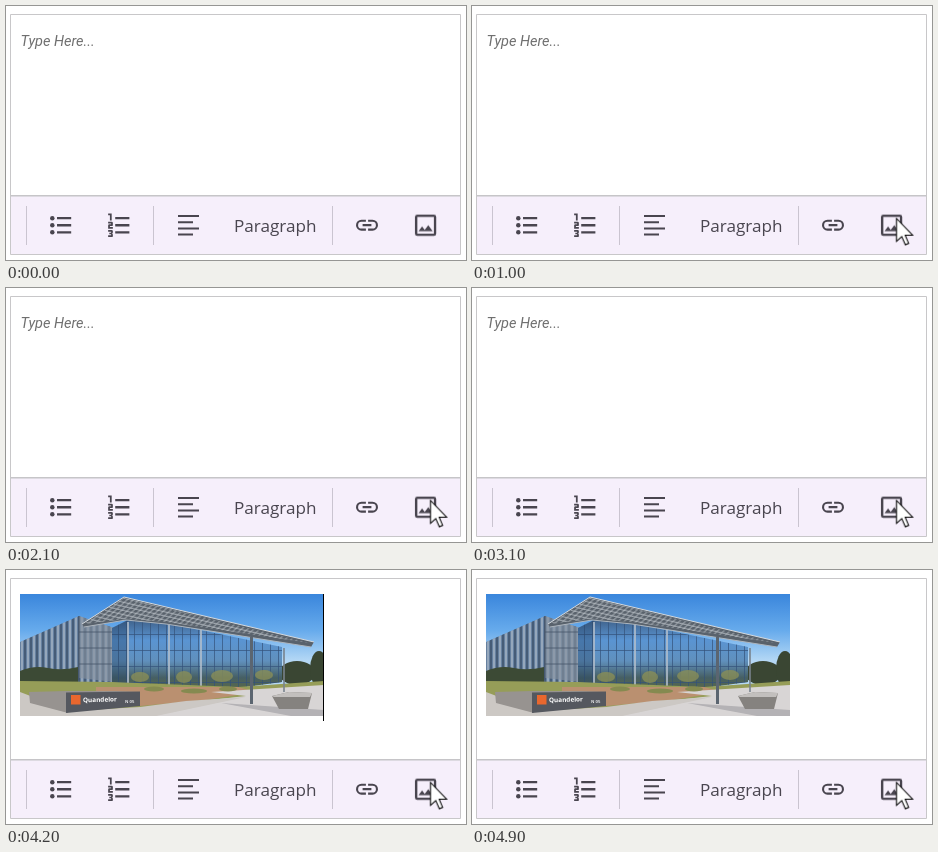
These frames come from a looping animation (460 px wide and 254 px high, 5 s). An HTML page:

```html
<!DOCTYPE html>
<html lang="en">
<head>
<meta charset="utf-8">
<title>Rich text editor</title>
<style>
html, body { margin: 0; width: 100%; height: 100%; overflow: hidden; background: #fff; }
svg { display: block; width: 460px; height: 254px; }
.hint { font: italic 14.5px Roboto, sans-serif; fill: #6f6f6f; }
.style { font: 17.1px "Open Sans", sans-serif; fill: #49454f; }
.brand { font: bold 6.4px "Open Sans", sans-serif; fill: #fff; }
.plate { font: bold 4.2px "Open Sans", sans-serif; fill: #e4e4e6; }
.icon { fill: #49454f; }
.anim { animation: 5s step-end infinite; }
#hint { animation-name: hint; }
#caret { animation-name: blink; }
#tall { animation-name: tall; }
#photo { animation-name: photo; }
#press { animation-name: press; }
#pic { animation-name: dim; }
#mouse { animation-name: move; }
@keyframes hint { 0% { opacity: 1; } 82%, to { opacity: 0; } }
@keyframes blink {
  0%, 20%, 40%, 62%, 82%, to { opacity: 0; }
  10%, 34%, 50%, 70% { opacity: 1; }
}
@keyframes tall { 0%, 92%, to { opacity: 0; } 82% { opacity: 1; } }
@keyframes photo { 0% { opacity: 0; } 84%, to { opacity: 1; } }
@keyframes press { 0%, 36%, to { opacity: 0; } 34% { opacity: .05; } }
@keyframes dim { 0%, 40%, to { opacity: 1; } 34% { opacity: .88; } }
@keyframes move {
  0% { transform: translate(418px, 270px); }
  4% { transform: translate(418px, 249px); }
  6% { transform: translate(423px, 240px); }
  8% { transform: translate(425.5px, 229px); }
  10% { transform: translate(425.5px, 220px); }
  12% { transform: translate(425px, 214px); }
  14%, to { transform: translate(424.5px, 212.5px); }
}
</style>
</head>
<body>
<svg viewBox="0 0 460 254">
  <defs>
    <linearGradient id="sky" x2="0" y2="1">
      <stop offset="0" stop-color="#3a86dc"/>
      <stop offset=".3" stop-color="#67abec"/>
      <stop offset=".55" stop-color="#b5d8f5"/>
    </linearGradient>
    <linearGradient id="glass" x2="0" y2="1">
      <stop offset="0" stop-color="#40638c"/>
      <stop offset=".3" stop-color="#5a94d2"/>
      <stop offset=".6" stop-color="#6090bd"/>
      <stop offset=".85" stop-color="#465f63"/>
      <stop offset="1" stop-color="#57684c"/>
    </linearGradient>
    <pattern id="panes" width="8" height="16" patternUnits="userSpaceOnUse">
      <path d="M0 .5H8M.5 0V16" stroke="#34517a" stroke-width=".7"/>
    </pattern>
    <pattern id="fins" width="6" height="14" patternUnits="userSpaceOnUse">
      <path d="M1 0V14" stroke="#30435c" stroke-width="1.2"/>
      <path d="M4 0V14" stroke="#a9b8c8" stroke-width="1.4"/>
    </pattern>
    <pattern id="slats" width="5" height="4" patternUnits="userSpaceOnUse" patternTransform="rotate(13) skewX(-35)">
      <path d="M0 1H5M1 0V4" stroke="#b9c0c6" stroke-width=".9"/>
    </pattern>
    <path id="wing" d="M14 72L73 46 108 58V113H14Z"/>
    <path id="hall" d="M106 58L122 50 160 53 276 77V112L232 118 106 114Z"/>
    <path id="rows" d="M9 5H21V7H9ZM9 11H21V13H9ZM9 17H21V19H9Z"/>
    <clipPath id="crop"><rect x="14" y="24" width="304" height="122"/></clipPath>
  </defs>

  <rect width="460" height="254" fill="#fff"/>
  <rect x="5" y="190" width="450" height="58" fill="#f6effb"/>
  <path d="M4.5 8.5H454.5V248.5H4.5Z" fill="none" stroke="#c8c7c9"/>
  <rect x="5" y="189" width="449" height="1.5" fill="#c6c5c8"/>
  <path d="M20.5 200V239M147.5 200V239M326.5 200V239" stroke="#cac4d0"/>

  <text id="hint" class="hint anim" x="14.5" y="40">Type Here...</text>
  <rect id="caret" class="anim" x="14.4" y="27" width="1.2" height="19"/>

  <g id="photo" class="anim"><g clip-path="url(#crop)">
    <rect x="14" y="24" width="304" height="122" fill="url(#sky)"/>
    <g fill="#3a4633">
      <ellipse cx="291" cy="103" rx="18" ry="12"/>
      <ellipse cx="313" cy="99" rx="9" ry="18"/>
    </g>
    <!-- left wing -->
    <use href="#wing" fill="#66809f"/>
    <use href="#wing" fill="url(#fins)"/>
    <path d="M73 46L108 58V112L73 108Z" fill="#8793a0" opacity=".65"/>
    <path d="M73 62H108M73 78H108M73 94H108M73 46V110" stroke="#465567" stroke-width=".8"/>
    <path d="M14 101Q28 95 42 98T72 97V112H14Z" fill="#3c4a35"/>
    <!-- glass hall -->
    <use href="#hall" fill="url(#glass)"/>
    <use href="#hall" fill="url(#panes)"/>
    <path d="M106 58L122 50V115L106 114Z" fill="#243f63" opacity=".35"/>
    <g fill="#8d9157" opacity=".75">
      <ellipse cx="134" cy="107" rx="9" ry="5"/>
      <ellipse cx="178" cy="107" rx="8" ry="6"/>
      <ellipse cx="216" cy="106" rx="11" ry="6"/>
      <ellipse cx="258" cy="105" rx="9" ry="5"/>
    </g>
    <path d="M122 52V116M163 55V118M195 60V119" stroke="#b4c0cd" stroke-width="1.6"/>
    <!-- canopy -->
    <path d="M76 54L118 27 308 72 305 77 160 54 120 50 78 57Z" fill="#59626c"/>
    <path d="M78 54L118 28 304 73 160 52 120 49Z" fill="url(#slats)"/>
    <path d="M76 54L118 27 308 72" fill="none" stroke="#d5dadf"/>
    <path d="M78 57L120 50 160 54 305 77" fill="none" stroke="#aeb6be"/>
    <!-- grounds -->
    <path d="M14 111L106 112 232 117 318 111V146H14Z" fill="#969d58"/>
    <path d="M90 117L232 117 250 122 200 130 134 136V122H90Z" fill="#ba9070"/>
    <path d="M205 122L318 115V146H90L150 136 240 126Z" fill="#d8d5d5"/>
    <path d="M14 122L64 141 134 137 180 131 240 127 150 146H14Z" fill="#ccc8c4"/>
    <path d="M215 133L318 140V146H285Z" fill="#b4b2b5"/>
    <g fill="#858a50">
      <ellipse cx="148" cy="119" rx="10" ry="2.5"/>
      <ellipse cx="188" cy="121" rx="13" ry="2.5"/>
      <ellipse cx="222" cy="119" rx="9" ry="2.5"/>
    </g>
    <path d="M278 78V122" stroke="#79838d" stroke-width="1.6"/>
    <path d="M245.5 67V134" stroke="#5b6570" stroke-width="3"/>
    <path d="M266 126L283 122 306 123 302 139H273Z" fill="#85827f"/>
    <path d="M266 126L283 122 306 123 304 127H268Z" fill="#c2bfbd"/>
    <!-- sign -->
    <path d="M23 122L60 121H134L62 124V143L24 133Z" fill="#979390"/>
    <path d="M60 122.5L134 121.5V136L60 143Z" fill="#55585f"/>
    <rect x="65" y="125" width="9.5" height="9.5" fill="#e9672e"/>
    <text class="brand" x="77" y="132.3" transform="rotate(-1.5 77 132)">Quandelor</text>
    <text class="plate" x="119" y="132.5">N 05</text>
  </g></g>
  <rect id="tall" class="anim" x="317" y="24" width="1" height="127"/>

  <g class="icon">
    <g transform="translate(40.4 205.1) scale(1.18)">
      <circle cx="5" cy="6" r="1.9"/><circle cx="5" cy="12" r="1.9"/><circle cx="5" cy="18" r="1.9"/>
      <use href="#rows"/>
    </g>
    <g transform="translate(98.6 205.1) scale(1.18)">
      <use href="#rows"/>
      <path d="M4.5 8V3.5H3V2H6V8ZM3 15V12.2a1 1 0 0 1 1-1H5.5V10.5H3V9H6a1 1 0 0 1 1 1V11.7a1 1 0 0 1-1 1H4.5V13.5H7V15ZM3 22V20.5H5.5V19.7H4V18.3H5.5V17.5H3V16H6a1 1 0 0 1 1 1V18a1 1 0 0 1-1 1 1 1 0 0 1 1 1V21a1 1 0 0 1-1 1Z"/>
    </g>
    <path d="M172 209H193V211H172ZM172 215.2H187V217.2H172ZM172 221.4H193V223.4H172ZM172 227.6H187V229.6H172Z"/>
    <path transform="translate(347.8 206) scale(1.1)" d="M3.9 12a3.1 3.1 0 0 1 3.1-3.1h4V7H7a5 5 0 0 0 0 10h4v-1.9H7A3.1 3.1 0 0 1 3.9 12ZM8 13h8v-2H8ZM17 7h-4v1.9h4a3.1 3.1 0 0 1 0 6.2h-4V17h4a5 5 0 0 0 0-10Z"/>
  </g>
  <text class="style" x="228" y="226">Paragraph</text>

  <rect id="press" class="anim" x="396" y="196" width="48" height="48" rx="4" fill="#49454f"/>
  <path id="pic" class="icon anim" transform="translate(405.4 205.1) scale(1.18)" fill-rule="evenodd" d="M5 3H19a2 2 0 0 1 2 2V19a2 2 0 0 1-2 2H5a2 2 0 0 1-2-2V5A2 2 0 0 1 5 3ZM5 5V19H19V5ZM6 17H18L14.25 12 11.25 16 9 13Z"/>

  <g id="mouse" class="anim">
    <path transform="scale(1.38)" d="M0 0V16.6L3.8 13.1 6.4 19 8.8 18 6.3 12.1H11.7Z" fill="#fff" stroke="#000" stroke-width=".75"/>
  </g>
</svg>
</body>
</html>
```
